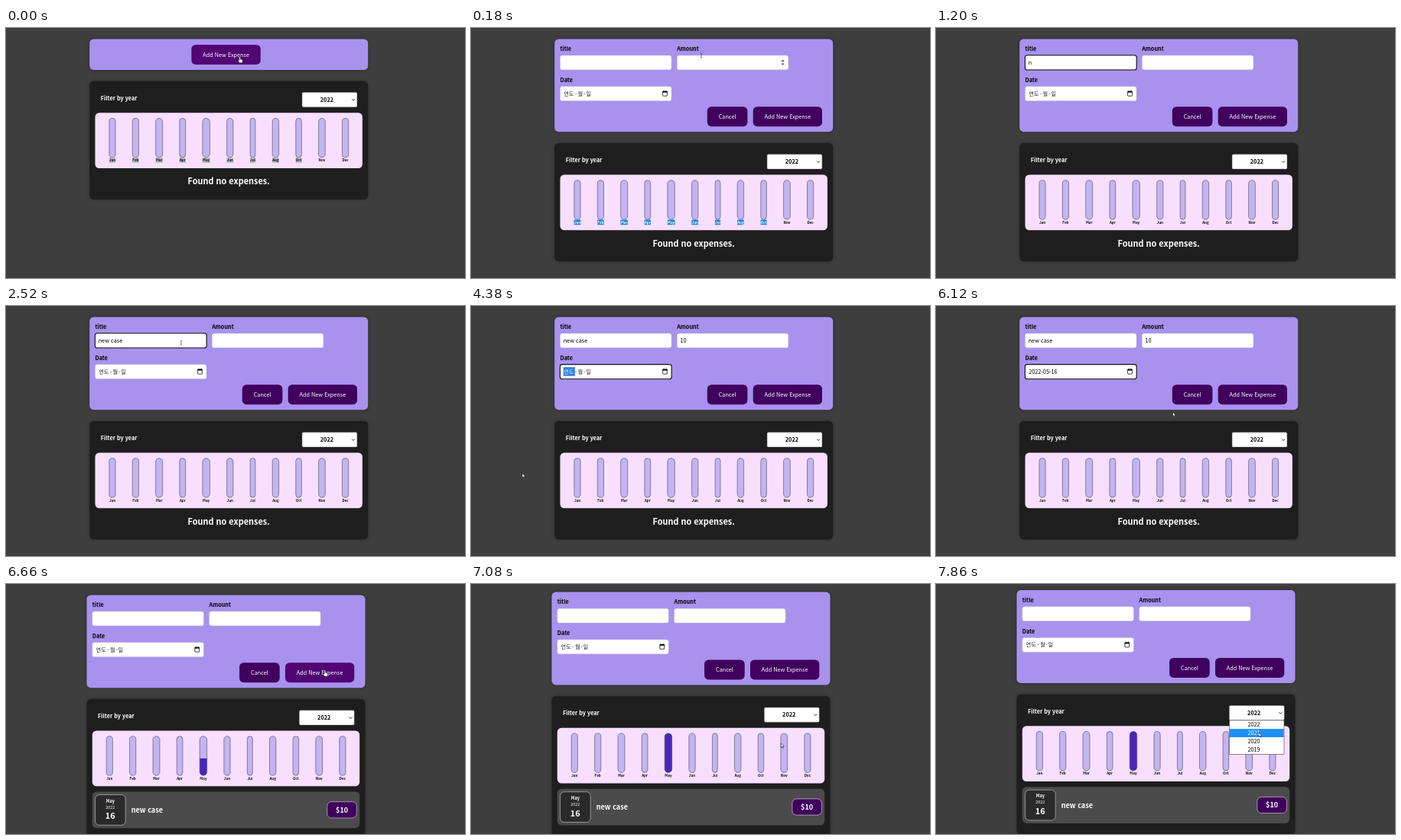
An HTML page for the animation above (8 s loop, 600 by 328 pixels).

```html
<!DOCTYPE html>
<html lang="ko">
<head>
<meta charset="utf-8">
<title>Expense tracker</title>
<style>
  html, body { margin: 0; width: 100%; height: 100%; overflow: hidden; background: #3f3e3f; }
  svg { display: block; width: 600px; height: 328px; }
  text { font-family: "Noto Sans CJK KR", "Noto Sans CJK JP", "Noto Sans CJK", sans-serif; white-space: pre; }
  .cal text { font-family: "Liberation Sans", "Noto Sans CJK KR", sans-serif; }
  .shadow { filter: drop-shadow(0 .5px 2.5px rgba(0, 0, 0, .3)); }
</style>
</head>
<body>
<svg id="stage" viewBox="0 0 600 328"></svg>
<script>
const REM = 7.28, R = 5.46, DURATION = 8000, STEP = 60;
const PLUM = '#40005d', PLUM_HOVER = '#510674';

const rect = (x, y, w, h, fill, r = 0, more = '') =>
  `<rect x="${x}" y="${y}" width="${w}" height="${h}" rx="${r}" fill="${fill}" ${more}/>`;
const text = (x, y, str, { size = REM, fill = '#000', bold, mid, id } = {}) =>
  `<text x="${x}" y="${y}" font-size="${size}" fill="${fill}"${bold ? ' font-weight="700"' : ''}` +
  `${mid ? ' text-anchor="middle"' : ''}${id ? ` id="${id}"` : ''}>${str}</text>`;
const group = (id, body, more = '') => `<g id="${id}" ${more}>${body}</g>`;
const line = (d, color, w) => `<path d="${d}" fill="none" stroke="${color}" stroke-width="${w}"/>`;

const field = (x, y) => rect(x, y, 145.4, 18.8, '#fff', 2.7, 'stroke="#ccc" stroke-width=".45"');
const button = (x, y, w, label, id, fill = PLUM) =>
  rect(x, y, w, 26, fill, R, `id="${id}"`) +
  text(x + w / 2, y + 15.7, label, { fill: '#fff', mid: true });

function formMarkup() {
  const label = (x, y, s) => text(x, y, s, { bold: true });
  const dateHint = group('dateHint',
    rect(120.7, 80.2, 15.2, 11.6, '#0f6fd6', 0, 'id="yearMark"') +
    text(121.2, 88.8, '연도', { id: 'year' }) + text(136, 88.8, '-') + text(139.6, 88.8, '월') +
    text(147, 88.8, '-') + text(150.3, 88.8, '일'), 'fill-opacity=".85"');
  const icon = rect(250.6, 83.2, 5.8, 6, 'none', .5, 'stroke="#111" stroke-width=".8"') +
    rect(250.4, 82.8, 6.2, 1.9, '#111') + line('M251.9 82v1.5M255.1 82v1.5', '#111', .8);
  return group('closed',
      rect(109.2, 14.4, 364, 40.6, '#a892ee', R, 'class="shadow"') +
      button(242.4, 21.9, 90.4, 'Add New Expense', 'addClosed', PLUM_HOVER)) +
    group('open',
      rect(109.2, 14.4, 364, 121.8, '#a892ee', R, 'class="shadow"') +
      label(116.5, 30.2, 'title') + label(269.2, 30.2, 'Amount') + label(116.5, 70.9, 'Date') +
      field(116.6, 36) + field(269.4, 36) + field(116.6, 76.8) +
      rect(116.4, 35.8, 145.8, 19.2, 'none', 2.8, 'id="focus" stroke="#111" stroke-width="1.1"') +
      text(120.7, 48, '', { id: 'titleText' }) + text(273.4, 48, '', { id: 'amountText' }) +
      group('spinner', '<path d="M405.6 44l2-2.4 2 2.4zM405.6 46.4l2 2.4 2-2.4z" fill="#444"/>') +
      dateHint + text(121.2, 88.8, '2022-05-16', { id: 'dateText' }) + icon +
      button(308.8, 103.2, 52.6, 'Cancel', 'cancel') +
      button(368.7, 103.2, 90.3, 'Add New Expense', 'add'));
}

// Each bar is as wide as its label; the rest of the row is shared out evenly.
const MONTHS = { Jan: 8.2, Feb: 8.2, Mar: 9, Apr: 7.8, May: 9.5, Jun: 8.3, Jul: 6.9, Aug: 8.4, Oct: 7.6, Nov: 8.7, Dec: 8.2 };
const BAR = { y: 199.7, h: 51.5 };

function chartMarkup() {
  const names = Object.keys(MONTHS);
  const gap = (335 - Object.values(MONTHS).reduce((a, b) => a + b)) / names.length;
  let x = 123.8 + gap / 2, out = rect(116.5, 192.5, 349.4, 72.8, '#f8dfff', R);
  names.forEach((name, i) => {
    const w = MONTHS[name];
    const bar = (fill, more) => rect(x, BAR.y, w, BAR.h, fill, w / 2, more);
    out += bar('#c3b4f3');
    if (name === 'May') {
      out += `<clipPath id="barClip">${bar('#000')}</clipPath>` +
        rect(x, BAR.y, w, BAR.h, '#4826b9', 0, 'id="fill" clip-path="url(#barClip)"');
    }
    out += bar('none', 'stroke="#313131" stroke-width=".5"');
    if (i < 9) out += rect(x - .2, 251.6, w + .4, 6.6, '#b9b9b9', 0, 'class="mark"');
    out += `<g class="${i < 9 ? 'picked' : ''}">` +
      text(x + w / 2, 256.5, name, { size: 4.55, bold: true, mid: true, fill: 'inherit' }) + '</g>';
    x += w + gap;
  });
  return out;
}

function cardMarkup() {
  const white = { fill: '#fff', mid: true };
  const item = rect(116.5, 272.6, 349.4, 47.6, '#4b4b4b', R) +
    rect(120.3, 276.5, 39.6, 39.8, '#2a2a2a', R, 'stroke="#ececec" stroke-width=".5"') +
    text(140, 286.8, 'May', { ...white, size: 5.46, bold: true }) +
    text(140, 294.6, '2022', { ...white, size: 5.46 }) +
    text(140, 308.4, '16', { ...white, size: 10.9, bold: true }) +
    text(167.4, 300, 'new case', { size: 9.1, fill: '#fff', bold: true }) +
    rect(423.6, 285.7, 38.4, 21.2, PLUM, R, 'stroke="#fff" stroke-width=".5"') +
    text(442.8, 299.8, '$10', { ...white, size: 9.1, bold: true });
  return group('card',
    rect(109.2, 151, 364, 155.3, '#1f1e1f', R, 'id="cardBox" class="shadow"') +
    text(123.8, 176.2, 'Filter by year', { fill: '#fff', bold: true }) +
    rect(387.1, 165.8, 71.8, 19.2, '#fff', 1.6, 'stroke="#777" stroke-width=".4"') +
    text(419.4, 178.1, '2022', { bold: true, mid: true }) +
    line('M452.2 174.6l1.9 1.9 1.9-1.9', '#111', .9) +
    group('chart', chartMarkup()) +
    group('empty', text(291.1, 286.6, 'Found no expenses.', { ...white, size: 10.92, bold: true })) +
    group('item', item));
}

function calendarMarkup() {
  const size = 5.46, col = i => 128 + i * 12.67;
  let out = rect(116.8, 96.3, 98.8, 126.8, '#fff', .8, 'stroke="#999" stroke-width=".4" class="shadow"') +
    text(121.3, 108.7, '2022년 05월', { size, bold: true }) +
    '<path d="M153.9 105.6h3.6l-1.8 2.4z"/>' +
    line('M189.6 110.6v-7.6M186.3 106.2l3.3-3.3 3.3 3.3M204.2 102.6v7.6M200.9 107l3.3 3.3 3.3-3.3', '#333', .8);
  [...'일월화수목금토'].forEach((d, i) => out += text(col(i), 125.2, d, { size, mid: true }));
  out += rect(135.2, 155.7, 11, 11.2, '#0f6fd6', .6, 'stroke="#111" stroke-width="1"');
  for (let n = 0; n < 42; n++) {
    const fill = n === 15 ? '#fff' : n > 30 ? '#777' : '#111';
    out += text(col(n % 7), 138 + Math.floor(n / 7) * 12.77, n % 31 + 1, { size, fill, mid: true, bold: n === 15 });
  }
  out += text(131.7, 216.8, '삭제', { size, fill: '#1a73e8', mid: true }) +
    text(200.6, 216.8, '오늘', { size, fill: '#1a73e8', mid: true });
  return group('calendar', out, 'class="cal"');
}

function menuMarkup() {
  let out = rect(383.6, 178.9, 71.4, 44.4, '#fff', 0, 'stroke="#444" stroke-width=".6"') +
    rect(383.9, 179.2, 70.8, 10.9, '#1e90ff', 0, 'id="menuMark"');
  [2022, 2021, 2020, 2019].forEach((y, i) =>
    out += text(415.6, 187.4 + i * 10.9, y, { mid: true, id: 'year' + y }));
  return group('menu', out);
}

const CURSORS = {
  arrow: '<path d="M0 0v5.6l1.3-1.2.9 2 .9-.4-.9-1.9h1.8z" fill="#fff" stroke="#111" stroke-width=".6"/>',
  hand: '<path d="M0-4c.6 0 .9.4.9.9v2.6l2 .5q.9.3.8 1.3l-.5 2.9h-3.8l-2-3q-.2-.9.8-.7l.9.7v-4.3c0-.5.3-.9.9-.9z" fill="#fff" stroke="#111" stroke-width=".6"/>',
  beam: line('M-1.1-3q1.1 0 1.1.7q0-.7 1.1-.7M0-2.3v4.6M-1.1 3q1.1 0 1.1-.7q0 .7 1.1 .7', '#222', .55),
};

// time, x, y, shape from here on
const PATH = [
  [0, 305.7, 41.5, 'hand'], [60, 305, 40, 'beam'], [180, 301, 36, 'beam'], [480, 268, 42, 'beam'],
  [840, 232, 46, 'beam'], [1200, 229, 48, ''], [2520, 229, 48, 'beam'], [2640, 288, 45, 'beam'],
  [2940, 288, 45, 'beam'], [3060, 285, 43, 'beam'], [3240, 285, 43, ''], [3420, 288, 40, 'beam'],
  [3600, 300, 39, 'beam'], [3840, 298, 39, 'beam'], [4080, 132, 86, 'beam'], [4140, 118, 110, 'arrow'],
  [4380, 67, 219.5, 'arrow'], [4440, 67, 219.5, 'arrow'], [4620, 224, 127, 'arrow'],
  [4860, 253, 87, 'arrow'], [5040, 253, 87, 'arrow'], [5340, 200, 114, 'arrow'],
  [5580, 141, 161, 'arrow'], [5700, 141, 161, 'arrow'], [5880, 170, 166, 'arrow'],
  [6300, 400, 122, 'hand'], [6480, 417, 117, 'hand'], [6780, 417, 117, 'hand'],
  [6900, 415, 133, 'arrow'], [7200, 400, 250, 'arrow'], [7500, 380, 284, 'arrow'],
  [7680, 428, 174, 'arrow'], [7740, 428, 176, 'arrow'], [7860, 422, 195, 'arrow'], [8000, 422, 195, 'arrow'],
];
const TITLE_KEYS = [1200, 1440, 1500, 1740, 1800, 1860, 1980, 2220];
const AMOUNT_KEYS = [3240, 3360];

stage.innerHTML = group('page', formMarkup() + cardMarkup()) + calendarMarkup() + menuMarkup() + group('cursor', '');

const $ = id => document.getElementById(id);
const show = (id, on) => $(id).style.display = on ? '' : 'none';
const set = (id, attrs) => { for (const k in attrs) $(id).setAttribute(k, attrs[k]); };
const ramp = (t, a, b) => Math.min(1, Math.max(0, (t - a) / (b - a)));
const typed = (str, keys, t) => str.slice(0, keys.filter(k => k <= t).length);

function cursorAt(t) {
  const i = PATH.findLastIndex(p => p[0] <= t);
  const a = PATH[i], b = PATH[Math.min(i + 1, PATH.length - 1)];
  const p = ramp(t, a[0], b[0] + (a === b)), k = p * p * (3 - 2 * p);
  return { x: a[1] + (b[1] - a[1]) * k, y: a[2] + (b[2] - a[2]) * k, shape: a[3] };
}

function render(t) {
  const open = t >= 60, saved = t >= 6540, menu = t >= 7740;
  const dated = t >= 5640 && !saved;
  const scroll = 6.3 * ramp(t, 6900, 7200);
  const c = cursorAt(t);

  set('page', { transform: `translate(${saved ? -3.7 : 0} ${-scroll})` });
  show('closed', !open);
  show('open', open);
  set('card', { transform: `translate(0 ${open ? 0 : -81.3})` });
  set('cardBox', { height: saved ? 183.6 : 155.3 });
  show('empty', !saved);
  show('item', saved);

  $('titleText').textContent = saved ? '' : typed('new case', TITLE_KEYS, t);
  $('amountText').textContent = saved ? '' : typed('10', AMOUNT_KEYS, t);
  const onDate = t >= 4080, onAmount = t >= 2640 && !onDate;
  show('focus', t >= 960 && !saved);
  set('focus', { x: onAmount ? 269.2 : 116.4, y: onDate ? 76.6 : 35.8 });
  show('spinner', c.shape === 'beam' && c.x > 269 && c.y < 55);
  show('dateHint', !dated);
  show('dateText', dated);
  const yearOn = onDate && !dated && !saved;
  show('yearMark', yearOn);
  set('year', { fill: yearOn ? '#fff' : '#000' });
  set('add', { fill: c.shape === 'hand' ? PLUM_HOVER : PLUM });

  const marked = t < 960;
  document.querySelectorAll('.mark').forEach(m => {
    m.style.display = marked ? '' : 'none';
    m.setAttribute('fill', open ? '#1a80e2' : '#b9b9b9');
  });
  document.querySelectorAll('.picked text').forEach(m =>
    m.setAttribute('fill', marked && open ? '#fff' : '#111'));

  const grow = saved ? 1 - (1 - ramp(t, 6570, 6870)) ** 1.6 : 0;
  set('fill', { y: BAR.y + BAR.h * (1 - grow), height: BAR.h * grow });

  show('calendar', t >= 5040 && t < 5640);
  show('menu', menu);
  const hover = c.y > 190 ? 1 : 0;
  set('menuMark', { y: 179.2 + hover * 10.9 });
  set('year2022', { fill: hover ? '#000' : '#fff' });
  set('year2021', { fill: hover ? '#fff' : '#000' });

  $('cursor').innerHTML = CURSORS[c.shape] || '';
  set('cursor', { transform: `translate(${c.x} ${c.y})` });
}

const start = performance.now();
let last = -1;
function tick() {
  const t = Math.min(7860, Math.floor((performance.now() - start) % DURATION / STEP) * STEP);
  if (t !== last) render(last = t);
  requestAnimationFrame(tick);
}
tick();
</script>
</body>
</html>
```
